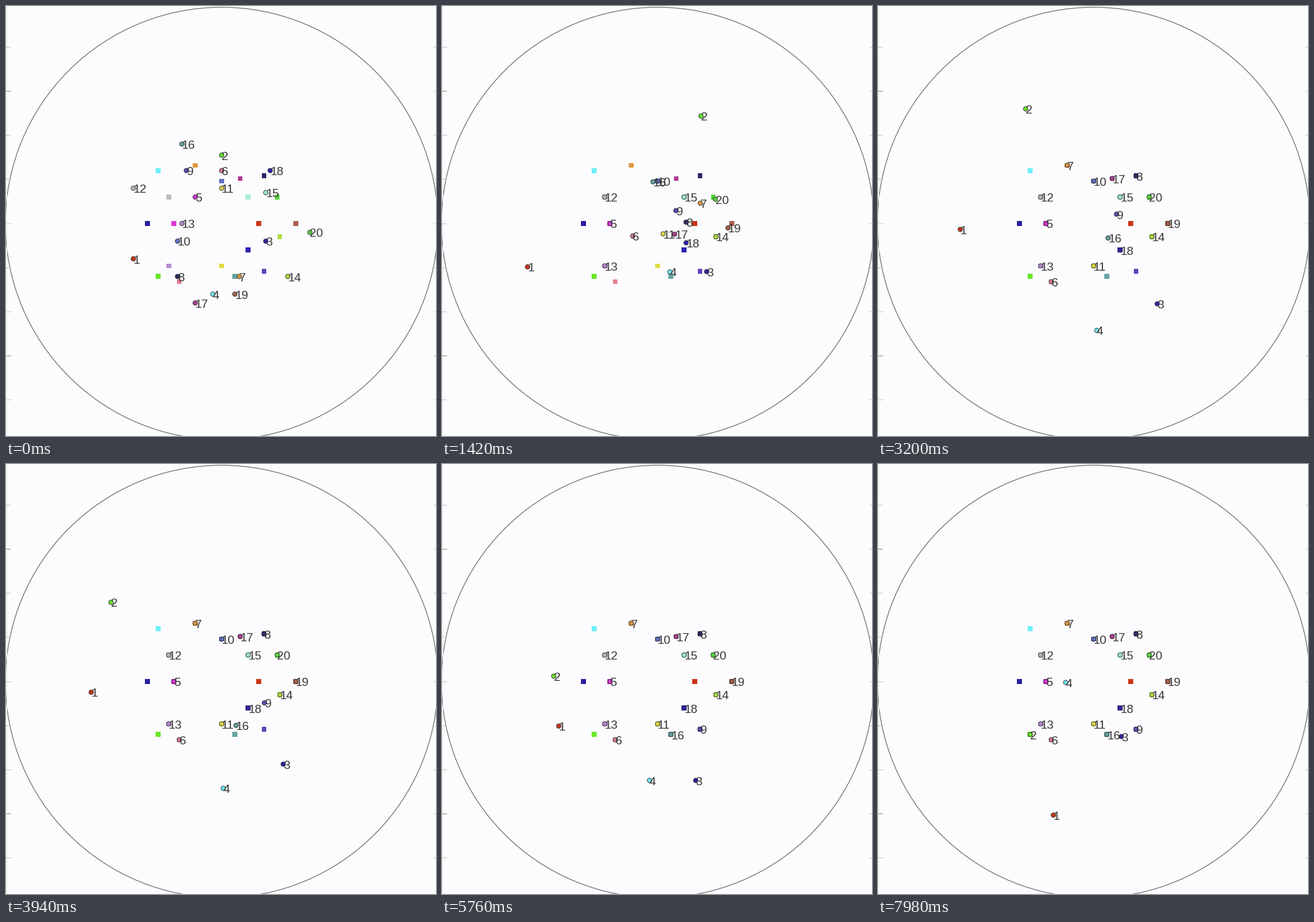
Recreate the animation shown at these times as a matplotlib script. Size 684 by 684 pixels, loop 8 s.

```python
import numpy as np
import matplotlib.pyplot as plt
from matplotlib.animation import FuncAnimation
from matplotlib.colors import to_rgb

SIZE = 684
LOOP, TICK = 8000, 20
UNIT = 140.4                       # pixels per axis unit
CENTER = np.array([343.0, 346.0])
SPEED = 4.9                        # pixels per step
KEYS = (30, 51, 84, 105, 139, 169)  # steps at which wanderers pass a waypoint

plt.rcParams["font.family"] = "Liberation Sans"
fig = plt.figure(figsize=(SIZE / 72, SIZE / 72), dpi=72, facecolor="#fcfcfe")
ax = fig.add_axes([0, 0, 1, 1])
ax.set_xlim(0, SIZE)
ax.set_ylim(SIZE, 0)
ax.axis("off")

# Arena: axis edge, half-unit ticks and the boundary circle
ax.plot([0.5, 0.5], [0, SIZE], color="#ececec", lw=1)
for k in range(-4, 5):
    y = CENTER[1] + k * UNIT / 2 - 0.5
    shade = "#8c8c8c" if abs(k) == 3 else "#c4c4c4"
    ax.plot([0, 6.5], [y, y], color=shade, lw=1)
    ax.plot([680, SIZE], [y, y], color="#c8c8c8", lw=1)
ax.add_patch(plt.Circle(CENTER, 2.45 * UNIT, fill=False, ec="#6c6c6c", lw=1.2))

agents = []


def place(start, goal):
    """Starts lie on a 0.05 unit grid, goals on a 0.03 unit grid."""
    return (CENTER + 0.05 * UNIT * np.array(start),
            CENTER + 0.03 * UNIT * np.array(goal))


def direct(color, start, goal, bend=0, end=None):
    """Go to the goal at even pace, bowing sideways by `bend` pixels."""
    a, b = place(start, goal)
    dist = np.hypot(*(b - a))
    dx, dy = (b - a) / dist
    side = bend * np.array([dy, -dx])
    steps = end or dist / SPEED

    def path(n):
        s = min(max(n, 0) / steps, 1)
        return a + (b - a) * s + side * 4 * s * (1 - s)

    agents.append((to_rgb(color), b, path))


def wander(color, start, goal, *points, end=None):
    """Follow a smooth curve through waypoints, then stop at the goal at `end`."""
    a, b = place(start, goal)
    keys = [0, *KEYS[:len(points)]] + ([end] if end else [])
    p = np.array([a, *points] + ([b] if end else []))
    v = np.gradient(p, keys, axis=0)

    def path(n):
        n = max(n, 0)
        if n >= keys[-1]:
            return p[-1]
        i = np.searchsorted(keys, n, side="right") - 1
        h = keys[i + 1] - keys[i]
        s = (n - keys[i]) / h
        ease = s * s * (3 - 2 * s)
        return (p[i] + (p[i + 1] - p[i]) * ease
                + h * s * (1 - s) * ((1 - s) * v[i] - s * v[i + 1]))

    agents.append((to_rgb(color), b, path))


wander("#cc3418", (-20, 8), (14, 0), (136, 415), (134, 364), (135.5, 363),
       (167, 379), (208, 466.5), (279, 558.5))
wander("#68e828", (0, -15.5), (-24, 20), (412, 175), (319, 135), (167, 220),
       (164, 282), (209.5, 394.5), end=150)
wander("#2820a0", (10, 4), (-28, 0), (421, 422.5), (438.5, 467.5), (441, 477.5),
       (421, 513), (390, 477.5), (387, 433.5))
wander("#70f0fa", (-2, 16), (-24, -20), (362.5, 423), (349.5, 498), (345.5, 516),
       (328.5, 515), (331, 472), (298.5, 347.5))
direct("#dc38d8", (-6, -6), (-18, 0))
direct("#e47c90", (0, -12), (-16, 22), end=51)
direct("#e09840", (4, 12), (-10, -22), bend=-80, end=61)
direct("#2c2868", (-10, 12), (16, -18), bend=-35, end=45)
wander("#6444b8", (-8, -12), (16, 18), (372, 325.5), (352.5, 311.5), (411, 380), end=94)
direct("#6070c4", (-10, 4), (0, -16))
direct("#e4dc48", (0, -8), (0, 16), bend=9, end=51)
direct("#bcbcb8", (-20, -8), (-20, -10))
direct("#b88cd0", (-9, 0), (-20, 16))
direct("#b0e044", (15, 12), (22, 5))
direct("#a4f0d4", (10, -7), (10, -10))
direct("#64a4a0", (-9, -18), (5, 20), bend=33, end=89)
direct("#b03c90", (-6, 18), (7, -17), bend=-29, end=50)
direct("#2c20b0", (11, -12), (10, 10), end=33)
direct("#a8604c", (3, 16), (28, 0), end=32)
direct("#58d83c", (20, 2), (21, -10), end=32)

colors = np.array([color for color, _, _ in agents])
goals = np.array([goal for _, goal, _ in agents])
ax.scatter(*goals.T, s=56, marker="s", c=colors, lw=0, zorder=3)
dots = ax.scatter(*goals.T, s=52, c=0.92 * colors + 0.03,
                  edgecolors=(0.1, 0.1, 0.1, 0.75), linewidths=1, zorder=4)
labels = [ax.text(0, 0, str(i + 1), color="#363636", size=19, zorder=5)
          for i in range(len(agents))]


def step_at(ms):
    """Three steps per 140 ms: one long, two short."""
    if ms < 20:
        return -1
    block, rest = divmod(ms - (20 if ms < 4920 else 40), 140)
    return 3 * block + (rest >= 100) + (rest >= 120)


def update(frame):
    step = step_at(frame * TICK)
    spots = np.array([path(step) for _, _, path in agents])
    dots.set_offsets(spots)
    for label, (x, y) in zip(labels, spots):
        label.set_position((x, y + 7.4))
    return [dots, *labels]


anim = FuncAnimation(fig, update, frames=LOOP // TICK, interval=TICK,
                     repeat=True, repeat_delay=0)
plt.show()
```
